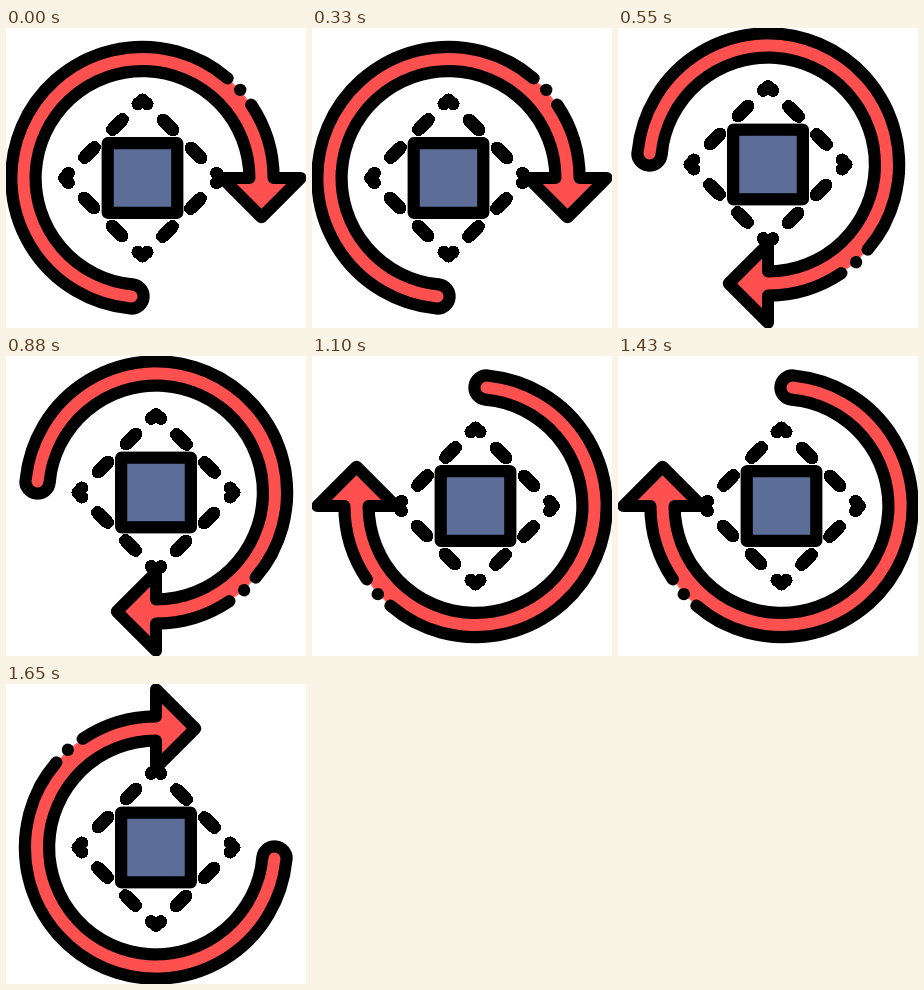
An HTML page that plays this animation: 300 by 300 pixels, repeating every 2200 ms.

```html
<!DOCTYPE html>
<html lang="en">
<head>
<meta charset="utf-8">
<title>Rotate</title>
<style>
  html, body { margin: 0; width: 100%; height: 100%; overflow: hidden; background: #fff; }
  svg { display: block; width: 100vw; height: 100vh; }
  .icon {
    fill: none;
    stroke: #000;
    stroke-width: 12.2;
    stroke-linecap: round;
    stroke-linejoin: round;
    transform-origin: 150px 150px;
    animation: turn 2200ms steps(4, end) infinite;
  }
  .dashes { stroke-width: 12.8; shape-rendering: crispEdges; }
  .red { fill: #ff5050; }
  .blue { fill: #5c6d97; }
  .dot { fill: #000; stroke: none; }
  .bare { stroke: none; }
  @keyframes turn { to { transform: rotate(360deg); } }
</style>
</head>
<body>
<svg viewBox="0 0 300 300">
  <defs>
    <!-- one side of the dashed diamond with its corner -->
    <path id="side" d="M-4.7-74L0-78L4.7-74M20.5-58l10 10M48.5-30l10 10"/>
  </defs>
  <g class="icon">
    <g transform="translate(136.5 150)">
      <g class="dashes">
        <use href="#side"/>
        <use href="#side" transform="rotate(90)"/>
        <use href="#side" transform="rotate(180)"/>
        <use href="#side" transform="rotate(270)"/>
      </g>
      <rect class="blue" x="-34.8" y="-34.8" width="69.6" height="69.6"/>
      <path class="red bare" d="M85.1-99.7A131.1 131.1 0 0 1 108.7-73.3"/>
      <path class="red" d="M108.7-73.3A131.1 131.1 0 0 1 131.1 0H158.2L119 39.2L79.8 0H106.9
        A106.9 106.9 0 1 0 -9.9 106.4A12.1 12.1 0 0 1 -12.1 130.5
        A131.1 131.1 0 1 1 85.1-99.7"/>
      <circle class="dot" cx="97.7" cy="-88.1" r="6.2"/>
    </g>
  </g>
</svg>
</body>
</html>
```
